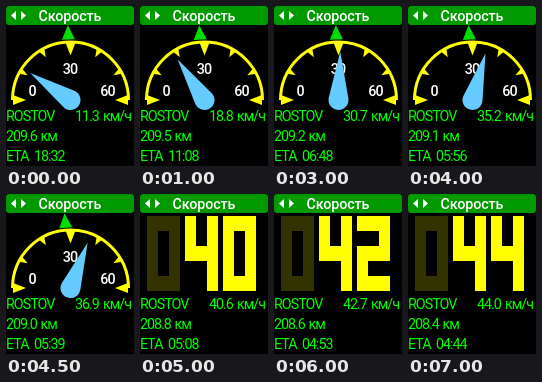
An HTML page that plays this animation: 128 by 160 pixels, repeating every 7.5 s.

```html
<!DOCTYPE html>
<html lang="ru">
<head>
<meta charset="utf-8">
<title>Скорость</title>
<style>
  html, body { margin: 0; width: 100%; height: 100%; overflow: hidden; background: #000; }
  svg { display: block; width: 128px; height: 160px; }
  text { font: 14.3px Roboto, "Open Sans", sans-serif; letter-spacing: -1px; fill: #0f0; white-space: pre; }
  .title { font-weight: 500; letter-spacing: -.1px; fill: #fff; }
  .mark { font-weight: 500; fill: #fff; text-anchor: middle; }
</style>
</head>
<body>
<svg viewBox="0 0 128 160">
  <rect width="128" height="160"/>
  <rect width="128" height="19" rx="3" fill="#090"/>
  <path d="M10 5v9l-5-4.500zM15 5v9l5-4.500z" fill="#fff"/>
  <text class="title" x="32.500" y="15">Скорость</text>

  <g id="gauge">
    <path d="M6.500 94a58 58 0 0 1 116 0" fill="none" stroke="#ff0" stroke-width="3"/>
    <g id="ticks" fill="#ff0"></g>
    <path id="course" d="M64.500 19l6.500 14.500h-13z" fill="#0d0"/>
    <text class="mark" x="26" y="90">0</text>
    <text class="mark" x="64" y="68">30</text>
    <text class="mark" x="101.500" y="90">60</text>
    <path id="needle" d="M16 94L62.500 84.200A10 10 0 1 1 62.500 103.800Z" fill="#6cf"/>
  </g>
  <g id="digits" shape-rendering="crispEdges"></g>

  <text x="0" y="115">ROSTOV</text>
  <text id="speed" x="69" y="115"></text>
  <text x="97" y="115">км/ч</text>
  <text id="dist" x="0" y="135"></text>
  <text x="34.500" y="135">км</text>
  <text x="0" y="155">ETA</text>
  <text id="eta" x="28" y="155"></text>
</svg>
<script>
const STEP = 500;
const CX = 64.5, CY = 94;
const speeds = [11.3, 14.9, 18.8, 20.8, 22.8, 26.9, 30.7, 33.1, 35.2, 36.9, 40.6, 41.7, 42.7, 43.1, 44.0];
const dists = [209.6, 209.5, 209.5, 209.5, 209.4, 209.3, 209.2, 209.1, 209.1, 209.0, 208.8, 208.7, 208.6, 208.5, 208.4];
const courses = [-2, -3, -4, -3, -5, -2, -2, -1.5, -3, -4.5];

const $ = id => document.getElementById(id);
const pad = n => String(n).padStart(2, "0");

// Scale marks point inwards, long ones at the labels
for (let a = 0; a <= 180; a += 30) {
  const mark = a % 90 ? "M7 91l8 3l-8 3z" : "M7 89l13 5l-13 5z";
  $("ticks").innerHTML += `<path d="${mark}" transform="rotate(${a} ${CX} ${CY})"/>`;
}

// Segments on a 3 by 5 grid: top, upper left, upper right, middle, lower left, lower right, bottom
const segments = ["M0 0h3v1h-3z", "M0 0h1v3h-1z", "M2 0h1v3h-1z", "M0 2h3v1h-3z", "M0 2h1v3h-1z", "M2 2h1v3h-1z", "M0 4h3v1h-3z"];
const shapes = ["1110111", "0010010", "1011101", "1011011", "0111010", "1101011", "1101111", "1010010", "1111111", "1111011"];

function digit(n, place, color) {
  const d = segments.filter((_, i) => shapes[n][i] === "1").join("");
  return `<path d="${d}" transform="translate(${7 + 38 * place} 22) scale(11 15)" fill="${color}"/>`;
}

function show(i) {
  const speed = speeds[i], dist = dists[i];
  const minutes = Math.floor(dist / speed * 60);
  const digital = speed >= 40;
  $("speed").textContent = speed.toFixed(1);
  $("dist").textContent = dist.toFixed(1);
  $("eta").textContent = pad(Math.floor(minutes / 60)) + ":" + pad(minutes % 60);
  $("gauge").style.display = digital ? "none" : "";
  if (digital) {
    const n = Math.floor(speed);
    $("digits").innerHTML = digit(0, 0, "#330") + digit(Math.floor(n / 10), 1, "#ff0") + digit(n % 10, 2, "#ff0");
  } else {
    $("digits").innerHTML = "";
    $("needle").setAttribute("transform", `rotate(${speed * 3} ${CX} ${CY})`);
    $("course").setAttribute("transform", `rotate(${courses[i]} ${CX} ${CY})`);
  }
}

const start = performance.now();
let shown = -1;
function tick() {
  const i = Math.floor((performance.now() - start) / STEP) % speeds.length;
  if (i !== shown) show(shown = i);
  requestAnimationFrame(tick);
}
tick();
</script>
</body>
</html>
```
